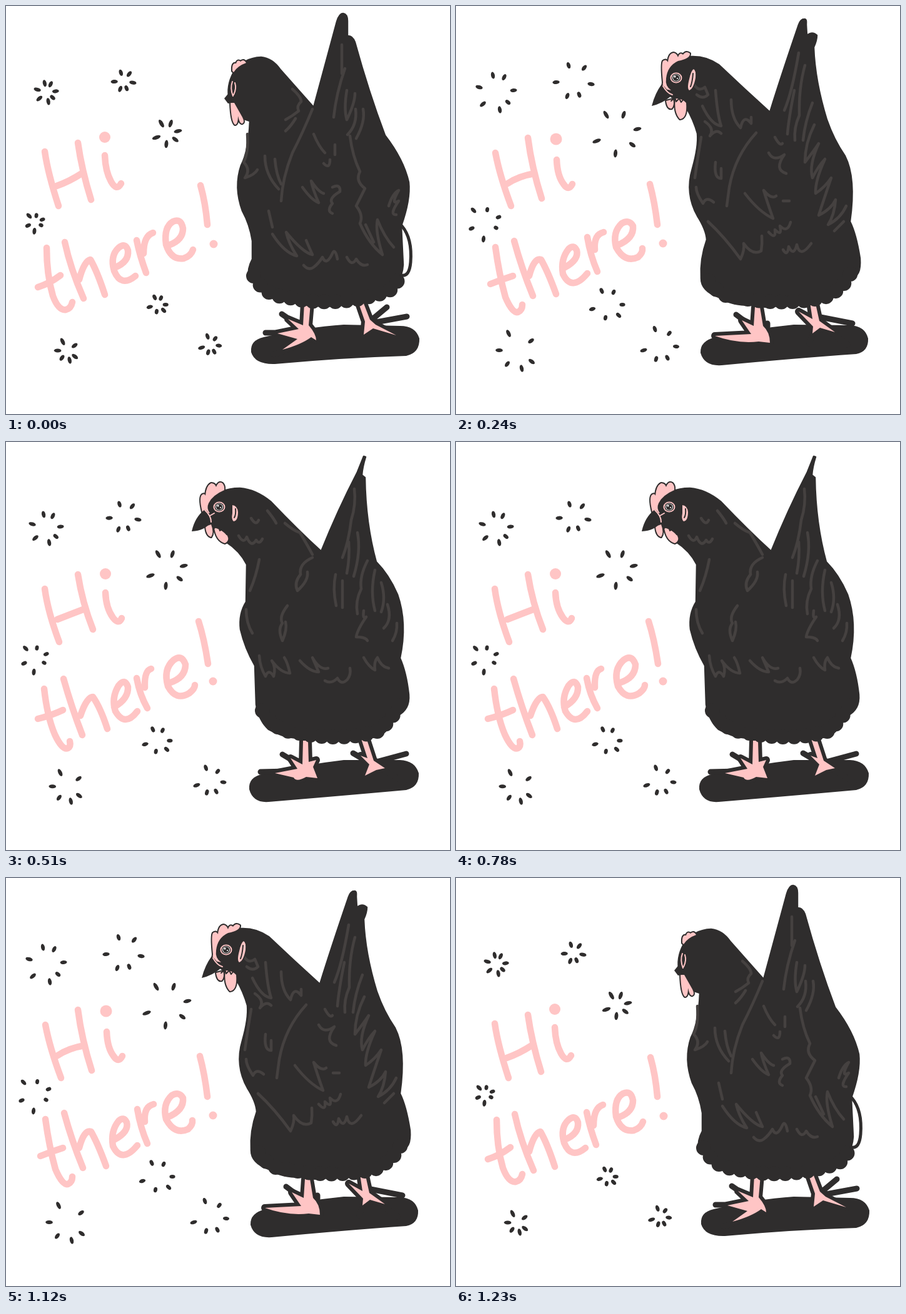
These frames come from a looping animation (710 by 653 pixels, 1440 ms). An HTML page with a canvas:

```html
<!DOCTYPE html>
<html lang="en">
<head>
<meta charset="utf-8">
<title>Hi there!</title>
<style>
html, body { margin: 0; width: 100%; height: 100%; overflow: hidden; background: #fff; }
canvas { display: block; }
</style>
</head>
<body>
<canvas id="stage" width="710" height="653" role="img" aria-label="A hen turns around: Hi there!"></canvas>
<script>
const INK = '#2f2d2d', PINK = '#ffc5c5', FEATHER = '#454140';
const ctx = document.getElementById('stage').getContext('2d');
ctx.lineCap = ctx.lineJoin = 'round';

const away = {
  spread: 0.53,
  letters: `M62 233Q67 268 84 320M115 219Q121 262 136 310M81 288Q101 281 121 268
    M158 239Q159 265 168 281Q177 297 184 284
    M65 387Q65 430 75 464Q84 488 96 486Q104 484 106 474M51 450Q70 444 87 431
    M94 378Q103 420 124 468M117 438Q125 408 135 406Q146 425 158 462
    M173 419Q197 410 195 391Q191 378 180 387Q166 400 173 424Q184 451 207 432
    M209 375Q214 400 224 427M220 396Q220 368 235 363
    M260 383Q283 375 283 356Q280 339 267 345Q252 354 256 382Q264 407 284 404Q296 400 299 390`,
  bang: 'M311 287Q319 315 322 350',
  dots: [[158, 210, 9], [332, 381, 6.5]],
  perch: 'M412 530Q390 535 392 554Q398 574 430 573Q540 563 640 560Q662 555 661 532Q655 512 630 512L540 510Q480 514 412 530Z',
  feet: `M477 476L487 476L484 511Q496 525 496 535L488 530Q472 542 442 550L466 533L434 524L468 517L451 501L475 511Z
    M563 473L570 471L582 502L591 510L624 527L587 516L572 526L574 505Z`,
  toes: 'M585 502L609 482M592 506L641 497M441 493L460 506M415 523L440 523M460 546L428 558',
  body: `M539 12Q546 13 546 24L546 48Q554 47 558 58Q580 138 606 207Q636 246 644 282Q647 310 632 352L635 414
    Q634 430 627 440Q625 458 610 462Q570 476 524 480Q470 482 440 468Q418 470 408 442Q396 446 388 434Q386 420 394 405
    L394 376Q390 350 378 328Q364 290 376 255Q388 232 390 184Q364 178 357 150Q352 128 364 106Q380 83 408 82
    Q426 84 438 101L492 162Q510 95 529 25Q533 12 539 12Z`,
  hem: 'M396 432Q415 464 445 465Q520 484 600 460Q625 455 629 428',
  loop: 'M633 352Q650 372 647 410Q645 434 632 431',
  feathers: `M458 133Q472 145 472 153Q464 160 468 168Q458 176 447 182M463 180Q456 192 447 200
    M490 165Q475 202 458 235Q442 275 440 312M492 205Q500 225 510 235M526 222V238M508 252Q518 262 518 246
    M386 205Q388 235 380 250Q392 262 382 275Q398 270 402 262M414 240Q414 270 436 293M430 245Q432 270 440 285
    M474 290Q488 310 500 315Q490 292 488 280Q500 298 508 300M522 290Q535 284 534 297Q515 308 522 316Q512 328 522 332
    M420 328L426 354M426 365Q445 395 465 400Q452 380 448 362Q475 395 490 398Q482 380 480 375
    M476 415Q484 424 492 418Q500 412 506 402Q512 416 521 398Q526 385 530 405M545 402Q553 418 560 405Q568 418 578 414
    M537 62V108M542 100Q528 140 524 178M545 135Q540 165 545 182Q558 155 558 140M559 165Q562 190 546 206
    M571 165Q575 185 560 212M550 208Q554 240 566 265Q558 280 574 292L560 320Q572 335 566 348Q580 380 602 398
    Q590 360 594 342Q605 370 620 386M575 350L588 378M612 320Q618 300 628 295Q614 320 628 312Q612 335 624 334`,
  comb: `M362 104Q361 90 368 92Q370 85 375 89Q380 84 384 91Q370 96 364 106Z
    M359 155Q360 185 366 190Q371 190 371 176Q374 190 378 188Q382 186 378 178L365 155Z`,
  beak: 'M358 137L349 148L355 156L361 155Z',
  lines: 'M362 121Q358 132 363 144M366 123Q369 132 364 142'
};

const turning = {
  spread: 1,
  letters: `M63 235Q70 272 88 320M115 211Q121 258 137 308M81 285Q100 272 126 268
    M161 246Q162 272 172 285Q180 297 186 285
    M63 386Q69 430 79 466Q90 492 99 490Q106 487 106 478M55 445Q72 438 91 432
    M93 376Q105 420 123 464M117 432Q125 402 136 406Q147 425 160 461
    M173 419Q197 406 193 391Q188 381 180 389Q167 405 171 429Q185 458 210 428
    M210 370Q215 400 226 425M222 390Q220 366 236 362
    M258 383Q285 372 283 352Q277 341 265 348Q250 362 256 386Q270 412 291 402Q299 395 298 388`,
  bang: 'M310 285Q318 315 322 350',
  dots: [[160, 213, 9.5], [331, 380, 6.5]],
  perch: 'M415 530Q390 536 391 555Q397 577 425 575Q540 564 640 557Q660 553 659 532Q654 512 630 511L540 510Q480 516 415 530Z',
  feet: `M478 482L486 482L491 512Q502 522 502 539L484 537Q450 541 414 528L472 525L457 503L476 512Z
    M566 474L574 472L581 504L606 522L582 515L570 524L571 513L548 489L570 501Z`,
  toes: 'M448 494L464 506M498 508V514M583 498L634 508M590 516L626 542M574 516L565 540',
  body: `M557 21Q561 20 560 30L561 47Q570 40 577 47Q577 55 572 66Q574 120 593 182Q604 214 622 240Q640 275 630 345
    Q640 365 646 404Q648 434 632 434Q628 452 612 456Q602 474 572 472Q550 482 524 476Q500 486 478 479Q440 480 420 466
    Q392 456 392 436Q390 405 401 374Q400 358 386 336Q366 300 378 260Q388 225 386 204Q380 182 368 162L340 142
    Q328 128 335 105Q345 85 376 81Q400 80 420 94Q460 132 502 170Q520 112 548 30Q551 21 557 21Z`,
  hem: 'M404 440Q425 468 450 466Q530 482 596 464Q626 445 633 422',
  feathers: `M380 125Q388 138 398 130L403 142Q395 150 385 142M415 135Q418 175 424 192Q408 190 394 160
    M440 150Q440 180 455 195Q460 172 472 188V178M398 185Q414 196 406 208Q416 196 424 204
    M480 203Q446 240 437 290L433 320M415 250Q412 276 424 276V260M392 210Q386 245 382 275M384 290Q384 300 395 316Q400 304 412 314
    M403 345Q430 370 455 405Q462 390 460 380Q474 400 488 392Q490 380 489 368
    M462 300Q485 330 507 340Q498 315 492 295Q504 310 512 304M500 362Q512 375 510 358Q522 370 518 352Q530 364 535 346
    M523 390Q530 402 532 385Q540 402 545 382Q550 405 568 380M523 312H533
    M548 75Q537 140 525 167M541 135Q532 180 530 205M558 95Q548 130 549 175Q540 195 542 215M570 155Q558 185 555 215
    M573 190Q558 220 558 250Q572 232 580 220Q564 255 570 275Q580 255 590 245Q574 280 575 300
    Q590 290 600 275Q588 310 580 335Q600 325 607 310Q605 335 595 350Q615 340 624 320M605 360Q615 350 620 345
    M500 235Q508 250 525 238Q508 262 528 268M510 210Q518 225 522 220`,
  comb: `M331 122Q328 92 331 88Q336 84 339 90Q340 76 348 75Q353 76 355 82Q358 73 363 78Q368 71 374 76
    Q375 84 355 88Q338 96 336 116Q334 128 344 135L330 132Z
    M336 152Q338 166 345 164Q350 158 347 149Z
    M351 148Q348 170 358 181Q370 180 368 155Q362 148 351 148Z
    M380 101Q384 103 383 115Q380 132 373 135Q369 132 373 117Q376 103 380 101Z`,
  beak: 'M329 125Q318 140 313 160Q330 156 343 145Q338 132 329 125Z',
  lines: 'M331 128Q338 140 346 142',
  marks: 'M379 108Q378 122 375 129M344 152L350 146L352 153L357 148L360 154L364 149M320 152Q330 150 337 145',
  eye: [352, 115]
};

const facing = {
  spread: 0.82,
  letters: `M62 235Q67 272 85 320M115 212Q122 257 139 300M82 284Q105 275 126 267
    M159 241Q160 266 171 281Q180 293 185 282
    M61 395Q66 440 78 468Q90 494 99 490Q104 487 102 479M51 443Q72 438 91 429
    M92 379Q105 425 122 469M119 438Q129 408 139 408Q151 425 162 459
    M173 424Q196 411 195 392Q190 377 180 390Q168 410 175 431Q190 457 210 431
    M209 378Q214 405 226 426M222 393Q221 366 232 363
    M260 386Q287 378 287 356Q281 339 268 349Q251 364 259 391Q272 415 293 402Q302 395 302 389`,
  bang: 'M308 287Q317 315 323 355',
  dots: [[159, 211, 9], [331, 383, 6.5]],
  perch: 'M412 531Q387 536 389 556Q395 578 420 576Q540 566 640 557Q661 552 660 530Q654 510 630 509L540 509Q480 516 412 531Z',
  feet: `M475 478L483 478L484 512L496 509L491 520L498 538L480 536Q464 545 460 537L430 530L466 523L455 506L474 516Z
    M567 472L575 470L588 510L606 522L592 525L574 534L581 516L567 502L578 506Z`,
  toes: 'M407 528L450 527M442 500L462 512M555 498L572 508M592 512L640 499M600 522L636 545',
  body: `M572 23L575 24Q570 40 569 53L574 57Q575 130 592 192Q612 212 626 244Q642 290 630 346Q640 368 644 404
    Q646 428 626 438Q614 448 608 462Q598 474 575 472Q540 480 504 477Q480 472 466 474Q440 472 420 460Q404 445 400 420
    L398 358Q382 330 375 300Q372 275 384 256L385 196Q374 174 352 160L326 135Q312 120 322 96Q340 74 374 74
    Q400 76 424 96Q466 140 504 175Q530 110 562 48Z`,
  hem: 'M410 430Q430 462 460 464Q530 480 592 464Q614 450 630 418',
  feathers: `M372 150Q380 164 385 152Q392 170 400 157Q405 165 410 155M392 122Q400 135 404 125
    M405 188Q400 215 390 238M418 110Q428 122 432 130M446 130Q460 142 470 145Q482 165 490 180
    M490 185Q468 195 471 212Q460 225 466 238Q484 222 482 208M450 262Q436 280 442 290Q434 300 442 318Q450 300 447 288
    M384 268Q384 290 394 306M405 342Q406 360 415 375Q420 362 428 375Q432 360 425 350Q440 370 454 370Q450 352 445 345
    M470 350Q486 368 500 368Q492 350 490 345Q502 366 515 362M510 382Q520 388 530 378Q536 390 546 380Q552 372 550 362
    M557 75Q560 100 552 125Q548 160 538 185M527 212Q522 235 528 262M548 160Q550 185 545 210M538 222V265M562 145Q568 175 556 215
    M578 190Q565 215 568 235Q558 255 562 275M572 270Q570 285 576 280Q562 300 560 312Q575 312 578 318
    M590 205Q582 240 590 270M600 225Q608 250 600 272M610 260Q618 285 604 298M625 290Q626 305 618 318
    M572 345Q580 360 590 365Q588 352 594 345Q600 360 612 362`,
  comb: `M314 112Q308 88 314 84Q318 82 319 86Q320 70 328 66Q334 66 336 72Q340 62 346 66Q350 70 349 77
    Q330 85 324 98Q320 106 326 114Z
    M319 135Q320 150 328 152Q333 145 328 132Z
    M333 137Q336 158 350 162Q358 158 354 150Q345 140 333 137Z
    M362 101Q370 102 371 112Q371 126 364 127Q360 124 362 114Z`,
  beak: 'M318 108Q302 120 297 143Q318 142 328 128Q326 112 318 108Z',
  lines: 'M318 109Q328 118 328 128M326 118L333 114',
  marks: 'M367 107Q368 116 365 121M333 138L339 133L342 142L348 138L353 148M302 139Q315 136 322 128',
  eye: [341, 104]
};

// Each burst: centre, then petal offsets at full spread.
const bursts = [
  [65, 138, -6, -27, 12, -24, 27, -3, 18, 16, 5, 28, -22, 19, -28, -8],
  [188, 120, -8, -25, 17, -21, 28, 5, 9, 22, -10, 24, -28, 2],
  [258, 204, -18, -30, 10, -30, 32, -7, 24, 18, -3, 32, -33, 12],
  [47, 346, -19, -19, 3, -20, 21, -8, 17, 9, -3, 27, -22, 10],
  [243, 478, -10, -22, 9, -20, 23, 0, 17, 17, -4, 21, -25, 7],
  [98, 552, -14, -28, 22, -16, 23, 17, 7, 28, -16, 21, -29, -1],
  [327, 542, -9, -25, 14, -18, 25, 3, 11, 21, -7, 23, -27, 9]
];

function fill(d, color) {
  ctx.fillStyle = color;
  ctx.fill(new Path2D(d));
}

function stroke(d, color, width) {
  ctx.strokeStyle = color;
  ctx.lineWidth = width;
  ctx.stroke(new Path2D(d));
}

function oval(x, y, rx, ry, color, angle = 0) {
  ctx.fillStyle = color;
  ctx.beginPath();
  ctx.ellipse(x, y, rx, ry, angle, 0, 2 * Math.PI);
  ctx.fill();
}

function drawBursts(spread) {
  for (const [cx, cy, ...petals] of bursts) {
    for (let i = 0; i < petals.length; i += 2) {
      const x = petals[i], y = petals[i + 1];
      const length = Math.hypot(x, y) * 0.2;
      oval(cx + x * spread, cy + y * spread, length, 3, INK, Math.atan2(y, x));
    }
  }
}

function drawEye(x, y) {
  oval(x, y, 9.5, 8.5, PINK);
  oval(x, y, 7.5, 6.8, INK);
  oval(x, y, 6, 5.5, '#fff');
  oval(x, y, 5, 4.8, INK);
  oval(x - 2, y - 2, 1.5, 1.5, '#fff');
  oval(x + 2, y + 1, 1, 1, '#fff');
}

function drawHen(pose) {
  fill(pose.perch, INK);
  stroke(pose.feet, INK, 12);
  stroke(pose.toes, INK, 9);
  fill(pose.feet, PINK);
  fill(pose.body, INK);
  stroke(pose.body, INK, 2.5);
  ctx.setLineDash([0, 18]);
  stroke(pose.hem, INK, 24);
  ctx.setLineDash([]);
  if (pose.loop) stroke(pose.loop, INK, 5);
  stroke(pose.feathers, FEATHER, 4.5);
  stroke(pose.comb, INK, 4);
  fill(pose.comb, PINK);
  fill(pose.beak, INK);
  stroke(pose.lines, PINK, 2);
  if (pose.eye) {
    stroke(pose.marks, INK, 2);
    drawEye(...pose.eye);
  }
}

function draw(pose) {
  ctx.fillStyle = '#fff';
  ctx.fillRect(0, 0, 710, 653);
  drawBursts(pose.spread);
  stroke(pose.letters, PINK, 10.5);
  stroke(pose.bang, PINK, 10.5);
  for (const [x, y, r] of pose.dots) oval(x, y, r, r, PINK);
  drawHen(pose);
}

function poseAt(t) {
  if (t < 240 || t >= 1230) return away;
  return t < 510 || t >= 960 ? turning : facing;
}

const start = performance.now();
let shown;
function tick() {
  const pose = poseAt((performance.now() - start) % 1440);
  if (pose !== shown) draw(shown = pose);
  requestAnimationFrame(tick);
}
tick();
</script>
</body>
</html>
```
